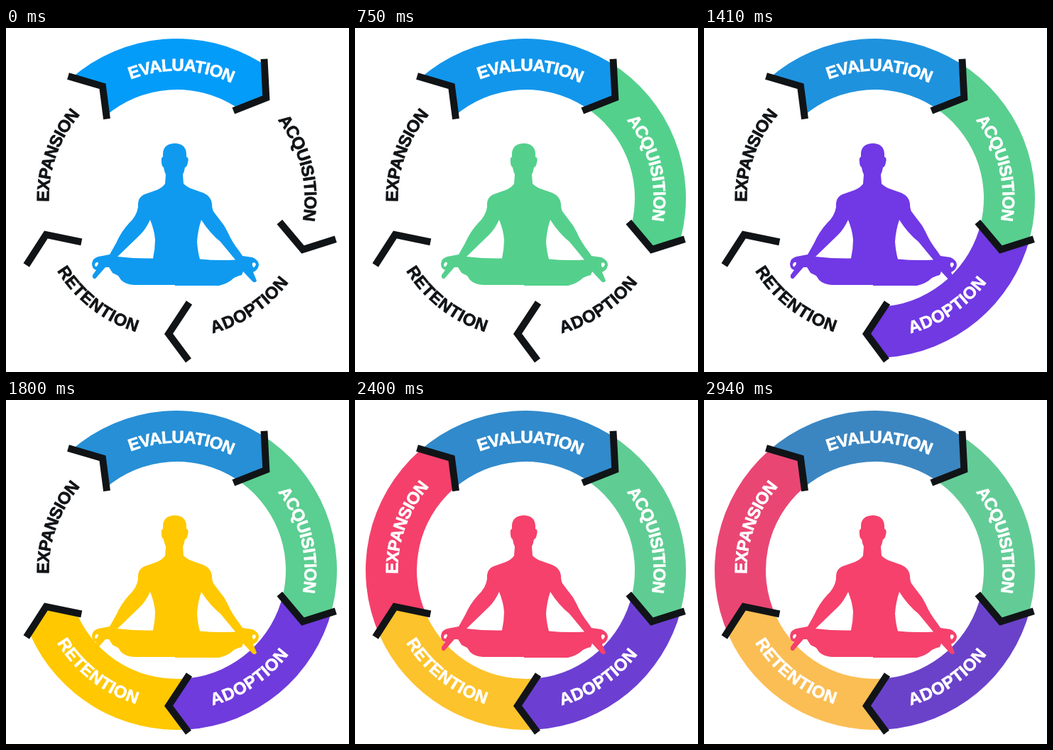
An HTML page for the animation above (2.97 s loop, 483 px wide and 486 px high).

```html
<!DOCTYPE html>
<html lang="en">
<head>
<meta charset="utf-8">
<title>Customer cycle</title>
<style>
  html, body { margin: 0; width: 100%; height: 100%; overflow: hidden; background: #fff; }
  svg { display: block; width: 483px; height: 486px; }
  text { font: bold 24px "Liberation Sans", Arial, sans-serif; text-anchor: middle; stroke-width: .7; }
  .mark { fill: none; stroke: #111417; stroke-width: 9.9; stroke-linejoin: miter; }
</style>
</head>
<body>
<svg id="stage" viewBox="0 0 483 486" xmlns="http://www.w3.org/2000/svg">
  <g id="ring"></g>
  <g id="marks"></g>
  <g id="labels"></g>
  <path id="figure" fill-rule="evenodd" d="
    M238 163 C247 163 254 168 254 178 L254 182 Q258 183 256 190 Q255 196 252 197
    Q251 203 249 207 L250 220 Q255 225 264 228 L278 233 Q289 238 290 248
    Q290 255 292 259 L301 271 Q308 279 312 288 Q318 302 329 316 L333 322
    L347 324 Q356 328 356 335 Q355 342 348 345 L353 357 Q351 361 347 358
    L334 344 L332 349 Q327 350 321 353 Q313 361 300 364 L238 364 L238 363 L180 363
    Q168 362 162 356 L158 350 L150 346 L145 338 L140 338
    L126 354 Q121 355 122 349 L127 342 Q121 340 121 333 Q122 325 130 323
    L146 320 L155 304 Q162 288 173 276 Q184 266 186 253 Q185 239 195 235
    L212 229 Q221 225 224 220 L225 207 Q223 203 222 197 Q219 195 219 189
    Q218 183 221 182 L221 178 C221 168 228 163 238 163 Z
    M203 271 Q197 284 189 292 L157 323 Q182 326 207 325.5
    Q210 312 210 299 Q209 286 203 271 Z
    M275 271 Q270 286 269 302 Q270 316 273 326.5 Q298 329 323 327.5
    L302 302 Q287 290 275 271 Z
    M126 332 Q130 329 130 333 Q128 338 126 337 Q124 335 126 332 Z
    M347 332 Q351 330 352 334 Q350 339 348 338 Q346 335 347 332 Z"/>
</svg>
<script>
const NS = "http://www.w3.org/2000/svg";
const LOOP = 2970, TICK = 30, STEP = 600;
const C = 240.5, OUTER = 225.5, INNER = 153.5, TEXT_R = 188.7;
const INK = "#111417";

// Each mark: outer end, tip, inner end.
const marks = [
  [[87.5, 68], [136, 82.3], [142, 128.5]],
  [[363.5, 43.7], [366.3, 98.8], [320.3, 117]],
  [[464.3, 298.3], [418, 313], [385.3, 274]],
  [[257, 469.7], [229, 432], [258, 388]],
  [[28.7, 335], [56.3, 292], [106.3, 302.3]]
];

// Label, middle angle clockwise from the top, fresh colour, faded colour, figure colour.
const parts = [
  { label: "EVALUATION", mid: 2.1, from: [4, 156, 249], to: [60, 134, 192], body: "#0f9af0" },
  { label: "ACQUISITION", mid: 76.1, from: [82, 209, 139], to: [99, 204, 150], body: "#54d08c" },
  { label: "ADOPTION", mid: 146.1, flip: true, from: [113, 56, 230], to: [106, 66, 200], body: "#7138e6" },
  { label: "RETENTION", mid: 217.8, flip: true, from: [255, 200, 0], to: [251, 190, 86], body: "#ffc800" },
  { label: "EXPANSION", mid: 289.7, from: [245, 64, 107], to: [233, 70, 116], body: "#f5416c" }
];

const byId = id => document.getElementById(id);

function add(parent, tag, attrs) {
  const node = document.createElementNS(NS, tag);
  for (const key in attrs) node.setAttribute(key, attrs[key]);
  return parent.appendChild(node);
}

function polar(deg, r) {
  const a = deg * Math.PI / 180;
  return [C + r * Math.sin(a), C - r * Math.cos(a)];
}

function onCircle([x, y], r) {
  const k = r / Math.hypot(x - C, y - C);
  return [C + (x - C) * k, C + (y - C) * k];
}

const arc = (r, sweep, end) => `A${r} ${r} 0 0 ${sweep} ${end}`;

function segmentPath(a, b) {
  return `M${onCircle(a[0], OUTER)}` + arc(OUTER, 1, onCircle(b[0], OUTER)) +
    `L${b[1]}L${onCircle(b[2], INNER)}` + arc(INNER, 0, onCircle(a[2], INNER)) +
    `L${a[1]}Z`;
}

parts.forEach((part, i) => {
  part.segment = add(byId("ring"), "path", { d: segmentPath(marks[i], marks[(i + 1) % 5]) });
  const turn = part.flip ? -40 : 40;
  const d = `M${polar(part.mid - turn, TEXT_R)}` +
    arc(TEXT_R, part.flip ? 0 : 1, polar(part.mid + turn, TEXT_R));
  add(byId("labels"), "path", { id: "line" + i, d, fill: "none" });
  part.text = add(byId("labels"), "text", { dy: 8.6 });
  add(part.text, "textPath", { href: "#line" + i, startOffset: "50%" }).textContent = part.label;
});

marks.forEach(m => add(byId("marks"), "path", { class: "mark", d: "M" + m.join("L") }));

function mix(a, b, k) {
  return `rgb(${a.map((v, i) => Math.round(v + (b[i] - v) * k))})`;
}

function draw(now) {
  const t = Math.floor((now % LOOP) / TICK) * TICK;
  const current = Math.floor(t / STEP);
  parts.forEach((part, i) => {
    const on = i <= current;
    const start = i * STEP;
    const ink = on ? "#fff" : INK;
    part.segment.setAttribute("fill", on ? mix(part.from, part.to, (t - start) / (LOOP - start)) : "none");
    part.text.setAttribute("fill", ink);
    part.text.setAttribute("stroke", ink);
  });
  byId("figure").setAttribute("fill", parts[current].body);
}

const origin = performance.now();
function loop() {
  draw(performance.now() - origin);
  requestAnimationFrame(loop);
}
loop();
</script>
</body>
</html>
```
